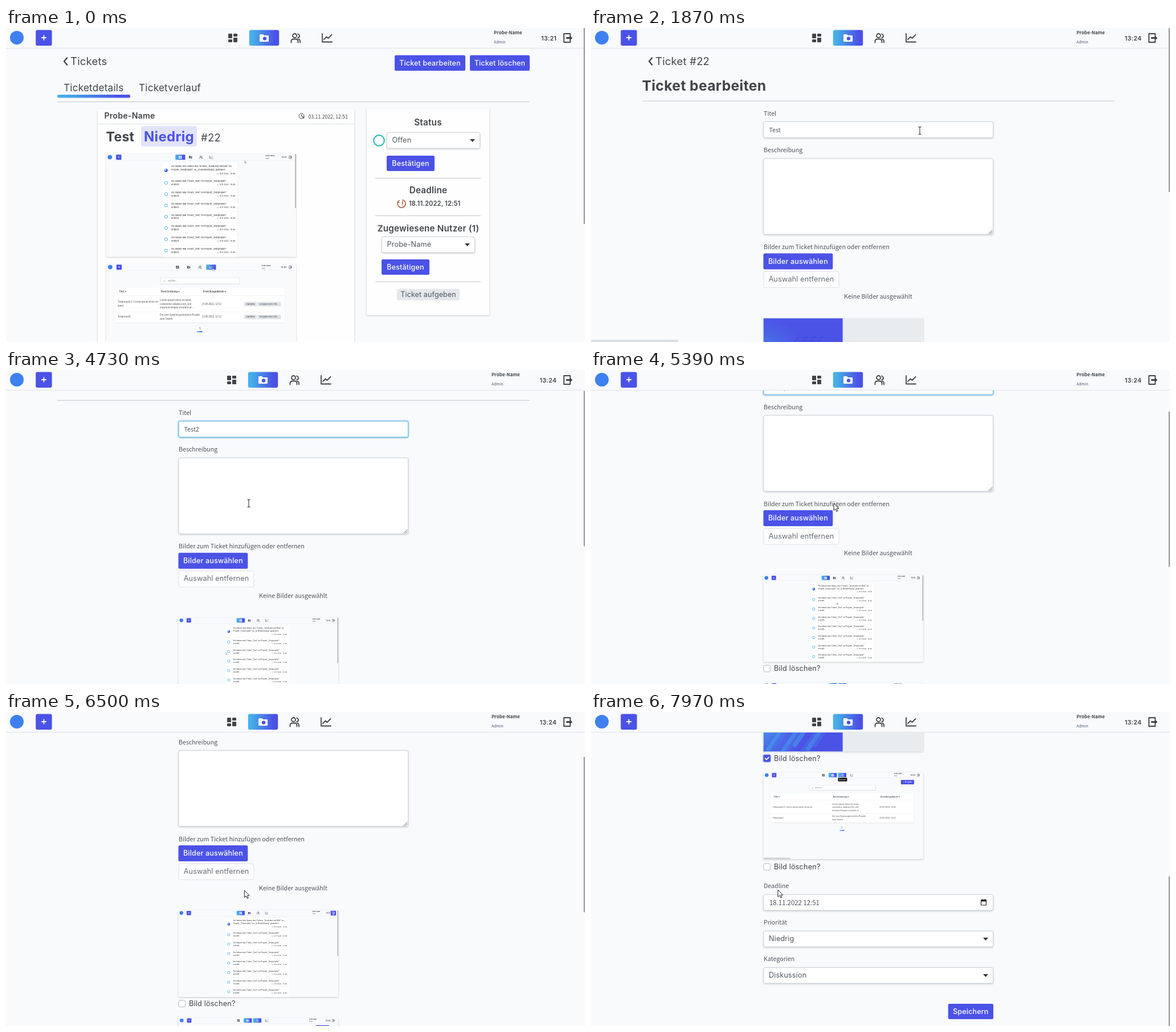
An HTML page that plays this animation: 1016x551 px, repeating every 8000 ms.

```html
<!DOCTYPE html>
<html lang="de">
<head>
<meta charset="utf-8">
<title>Ticket bearbeiten</title>
<style>
html, body { margin: 0; width: 100%; height: 100%; overflow: hidden; background: #f8fafc; }
#stage { display: block; width: 1016px; height: 551px; }
text { font-family: Inter, "Open Sans", sans-serif; letter-spacing: .014em; white-space: pre; }
.body { font-family: "Noto Sans CJK JP", "Noto Sans", sans-serif; letter-spacing: 0; }
.mid { text-anchor: middle; }
.end { text-anchor: end; }
.shadow { filter: drop-shadow(0 1px 1.5px #0003); }
.line { fill: none; stroke-width: 1.8; stroke-linecap: round; stroke-linejoin: round; }
</style>
</head>
<body>
<svg id="stage" viewBox="0 0 1016 551"></svg>
<script>
const INK = '#414449', GREY = '#50555b', BLUE = '#4b52e6', SKY = '#45b0e8', USER = 'Probe-Name';

const rect = (x, y, w, h, fill, r = 0, more = '') =>
  `<rect x="${x}" y="${y}" width="${w}" height="${h}" rx="${r}" fill="${fill}" ${more}/>`;
const text = (x, y, s, size = 12.4, weight = 400, fill = INK, cls = '') =>
  `<text x="${x}" y="${y}" font-size="${size}" font-weight="${weight}" fill="${fill}" class="${cls}">${s}</text>`;
const body = (x, y, s, size = 10.68, fill = GREY, cls = '') => text(x, y, s, size, 400, fill, 'body ' + cls);
const path = (d, color = INK, more = '') => `<path class="line" d="${d}" stroke="${color}" ${more}/>`;
const dot = (x, y, r, fill, more = '') => `<circle cx="${x}" cy="${y}" r="${r}" fill="${fill}" ${more}/>`;
const rule = (x, y, w, color = '#c3c6ca') => rect(x, y, w, 1, color);
const group = (id, s, more = '') => `<g id="${id}" ${more}>${s}</g>`;
const repeat = (n, f) => Array.from({ length: n }, (_, i) => f(i)).join('');

const button = (x, y, w, h, label, id) => rect(x, y, w, h, BLUE, 2.5) +
  (id ? rect(x, y, 0, h, SKY, 2.5, `id="${id}"`) : '') +
  text(x + w / 2, y + h / 2 + 4.2, label, 12.5, 500, '#fff', 'mid');
const field = (x, y, w, h, more = '') =>
  rect(x + .5, y + .5, w - 1, h - 1, '#fff', 2.5, `stroke="#ced4da" class="shadow" ${more}`);
const select = (x, y, w, label) => field(x, y, w, 28.5) + text(x + 9.5, y + 18, label, 12.6, 400, GREY) +
  `<path d="M${x + w - 18} ${y + 12}h9l-4.5 5z" fill="#333"/>`;
const scrollbar = (h, more = '') => rect(1013.5, 0, 2.5, h, '#a0a2a5', 1.2, more);

// Icons are drawn around (0, 18)
const icons = [
  c => rect(-8, 10, 7, 8, c, 1) + rect(1, 10, 7, 5, c, 1) + rect(-8, 20, 7, 5, c, 1) + rect(1, 17, 7, 8, c, 1),
  (c, on) => `<path d="M-8 12q0-1 1-1h5l2 2h7q1 0 1 1v9q0 1-1 1h-14q-1 0-1-1z" fill="${c}"/>` +
    dot(1, 18.5, 3.2, on ? BLUE : '#fff'),
  c => path('M-7.500 25.500v-2q0-4 4-4h4q4 0 4 4v2M5.500 19.500q2.500 1 2.500 4v2M4 10.500q3 1 3 3.500t-3 3.500', c) +
    dot(-1.5, 13.5, 3.5, 'none', `stroke="${c}" stroke-width="1.8"`),
  c => path('M-8 10v14.500h17M-5 20l4.500-4.500 3 2.500 6-6', c)
];
const logout = (x, c = INK) => `<g transform="translate(${x} 0)">` +
  path('M5 13v-3h-11v15h11v-3', c) + `<path d="M-2 16h6v-3.500l5 5-5 5v-3.500h-6z" fill="${c}"/></g>`;

function nav({ active = [1], gap = 55, shift = 0, nameX = 852, time = '13:24', logo = 19 }) {
  const items = icons.map((icon, i) => {
    const on = active.includes(i), x = 561 + shift - (3 - i) * gap;
    return `<g transform="translate(${x} 0)">` + (on ? rect(-26.2, 3.6, 52.4, 27.3, 'url(#fade)', 3) : '') +
      icon(on ? '#fff' : INK, on) + '</g>';
  }).join('');
  return rect(0, 0, 1016, 35, '#f8fafc') + rule(0, 35, 1016, '#dfe2e6') + dot(logo, 17, 12, '#3f80f0') +
    rect(logo + 33.2, 3.6, 28.4, 27.3, BLUE, 3) + path(`M${logo + 43.7} 17h7.500m-3.750-3.750v7.500`, '#fff') + items +
    text(nameX, 10.7, USER, 8, 700, INK, 'body') + body(nameX, 26.8, 'Admin', 6.8, '#4b5b75') +
    text(966, 21.5, time, 10.8, 600, INK, 'end') + logout(985);
}

const thumb = (x, y, w, content) => {
  const box = `x="${x}" y="${y}" width="${w}" height="${w * 551 / 1016}"`;
  return `<rect ${box} fill="#f8fafc" class="shadow"/><svg ${box} viewBox="0 0 1016 551">${content}</svg>`;
};
const pointer = (x, y, id = '') =>
  `<use href="#arrow" ${id && `id="${id}"`} transform="translate(${x} ${y})"/>`;

function dashboard(more) {
  const entry = (y, a, b) => text(348, y, a, 11.7, 500) + text(348, y + 18, b, 11.7, 500);
  const date = y => text(690, y, '◷  10.11.2022 · 10:48', 9.8, 500, INK, 'end');
  const ring = y => dot(320, y, 8, 'none', `stroke="${SKY}" stroke-width="3"`);
  return nav({ active: [0], time: '14:12' }) + rect(299, 46, 405, 510, '#fff', 3, 'class="shadow"') +
    entry(71, 'Sie haben den Status des Tickets „Testticket mit Bild“ im', 'Projekt „Testprojekt“ zu „In Bearbeitung“ geändert.') +
    date(110) + ring(88) + `<path d="M320 80a8 8 0 1 1-8 8h8z" fill="${BLUE}"/>` +
    repeat(7, i => {
      const y = 155 + i * 60.4;
      return rule(299, y - 29, 405, '#e2e5e8') + ring(y) +
        entry(y - 5, 'Sie haben das Ticket „Test“ im Projekt „Testprojekt“', 'erstellt.') + date(y + 13);
    }) + rect(1011, 0, 4, 290, '#999', 2) + more;
}

function projects(stats) {
  const cols = stats ? [67, 293, 518] : [65, 443, 744], heads = ['Titel', 'Beschreibung', 'Erstellungsdatum'];
  const lines = (x, y, list) => list.map((s, i) => body(x, y + i * 20, s, 13, INK)).join('');
  const tag = (x, y, w, s) => rect(x, y, w, 24, '#e1e5e9', 3) + text(x + w / 2, y + 16, s, 12.5, 400, INK, 'mid');
  return nav({ active: stats ? [3] : [1, 2], gap: 60, nameX: 831, time: '14:00', logo: 21 }) +
    `<g transform="translate(0 ${stats ? 0 : 6})">` +
    field(289, 74, 425, 33) + body(329, 95, 'Suchen...', 12, '#777') + path('M310 95l-4 4', '#888') + dot(312, 90, 4, 'none', 'stroke="#888"') +
    rect(49, 128, 908, 186, '#fff', 4, 'class="shadow"') +
    heads.map((s, i) => text(cols[i], 154, s + ' ▾', 13, 600)).join('') + rule(49, 168, 908, '#ddd') + rule(49, 256, 908, '#ddd') +
    lines(cols[0] - 6, stats ? 208 : 219, stats ? ['Testprojekt 2: Lorem ipsum dolor sit', 'amet'] : ['Testprojekt 2: Lorem ipsum dolor sit amet']) +
    lines(cols[0] - 6, 288, ['Testprojekt']) +
    lines(cols[1] - 6, 199, ['Lorem ipsum dolor sit amet,', 'consetetur adipisici elit, sed', 'eiusmod tempor incidunt ut …']) +
    lines(cols[1] - 6, 278, ['Ein vom System generiertes Projekt', 'zum Testen.']) +
    lines(cols[2] - 6, 219, ['23.09.2022, 12:52']) + lines(cols[2] - 6, 288, ['23.09.2022, 12:12']) +
    (stats ? [203, 272].map(y => tag(738, y, 67, 'Statistik') + tag(808, y, 128, 'Vergleichen mit...')).join('')
      : button(874, 42, 84, 28, '+ Projekt')) +
    text(500, 350, '1', 14, 500, INK, 'mid') + rect(485, 360, 30, 5, 'url(#fade)', 2) + '</g>' +
    (stats ? '' : rect(0, 542, 170, 9, '#ccd0d4'));
}

const login = rect(0, 0, 1016, 551, '#e8ecef') + rect(0, 0, 504, 551, 'url(#splash)') +
  repeat(9, i => path(`M${-10 + i * 42} ${560 - i % 3 * 25}l${70 + i % 4 * 25} ${-100 - i % 4 * 36}`,
    i % 2 ? '#46a4ec' : '#4a72ea', 'stroke-opacity=".5" style="stroke-width:26"')) +
  repeat(4, i => path(`M${200 + i * 50} 150l26 -37`, '#444adb', 'stroke-opacity=".5" style="stroke-width:13"'));

const tooltip = (id, x, y, w, s) => group(id, rect(x, y, w, 23, '#111', 3) + text(x + w / 2, y + 15, s, 10, 500, '#fff', 'mid'));

const back = label => path('M107 52.500l-5 6 5 6', INK, 'style="stroke-width:2.4"') + text(113, 64.5, label, 18.4, 400);

const ticketPage = nav({ shift: 2, nameX: 856, time: '13:21' }) + back('Tickets') +
  button(682, 47.7, 124, 27.3, 'Ticket bearbeiten', 'sweepEdit') + button(814, 47.7, 105, 27.3, 'Ticket löschen') +
  text(101, 110.5, 'Ticketdetails', 17.1, 400) + text(233, 110.5, 'Ticketverlauf', 17.1, 400) +
  rect(90, 117, 128, 5.5, 'url(#fade)', 2.5) + rule(90, 129, 829) +
  rect(161, 142, 450, 420, '#fefefe', 2, 'class="shadow"') + text(172.5, 159, USER, 14.2, 600) + rule(161, 168, 450, '#dcdfe3') +
  dot(518.5, 154.5, 4.5, 'none', `stroke="${INK}"`) + path('M518.500 152v3h2', INK, 'style="stroke-width:1"') +
  `<path d="M520 155l4.500 2-2 .7-.8 2z" fill="${INK}"/>` + body(600, 158.5, '03.11.2022, 12:51', 8.7, INK, 'end') +
  text(175.5, 198.5, 'Test', 23, 700) + rect(237, 172, 98, 36, '#e2e3fa', 4) + text(286, 198.5, 'Niedrig', 24, 700, BLUE, 'mid') +
  text(342, 198.5, '#22', 18.5) +
  thumb(176, 221, 333, dashboard(pointer(741, 36))) +
  thumb(176, 414, 333, projects(true) + '<use href="#hand" transform="translate(570 20)"/>') +
  rect(633, 142, 215, 362, '#fefefe', 2, 'class="shadow"') +
  text(740.5, 171, 'Status', 15.3, 600, INK, 'mid') + dot(654.5, 197.5, 9.3, '#fff', 'stroke="#2fbdb6" stroke-width="2.2"') +
  select(668, 183, 164, 'Offen') + button(668, 224, 84, 27, 'Bestätigen') + rule(648, 263, 185) +
  text(741, 290, 'Deadline', 15.3, 600, INK, 'mid') +
  path('M690 302.500a7 7 0 1 0 6 -1M696 304v5m0 3v.1M690 306h-1.500', '#a85a32', 'style="stroke-width:1.5"') +
  text(707, 312, '18.11.2022, 12:51', 11.1, 600) + rule(648, 329, 185) +
  text(741, 356.5, 'Zugewiesene Nutzer (1)', 15.2, 600, INK, 'mid') + select(659, 366, 164, USER) +
  button(659, 406, 84, 27, 'Bestätigen') + rule(648, 445, 185) +
  rect(686, 458, 110, 20, '#e3e8ec', 3) + text(741, 472.3, 'Ticket aufgeben', 12.4, 400, GREY, 'mid') +
  scrollbar(344);

const check = y => rect(303, y - 5.5, 11.5, 11.5, '#fff', 2.5, 'stroke="#b5b9be"') + text(321, y + 4.5, 'Bild löschen?', 12.7, 400);

const editPage = group('scroller', back('Ticket #22') + text(89.5, 109.8, 'Ticket bearbeiten', 24.7, 700) + rule(90, 127.5, 829) +
  body(303, 153.6, 'Titel') + field(302.5, 164, 403.5, 29) +
  group('focus', rect(302, 163.5, 404.5, 30, 'none', 3.5, `stroke="${SKY}" stroke-width="2.4" stroke-opacity=".25"`) +
    rect(303, 164.5, 402.5, 28, 'none', 2.5, 'stroke="#62bdec"')) +
  body(312.5, 183, '<tspan id="typed">Test</tspan>') + rect(332, 171, 1, 15, '#222', 0, 'id="caret"') +
  body(303, 218, 'Beschreibung') + field(302.5, 228.5, 403.5, 134) + path('M698 361l6-6m-3 6l3-3', '#666', 'style="stroke-width:1"') +
  body(303, 388, 'Bilder zum Ticket hinzufügen oder entfernen') +
  button(302.5, 395.4, 121.8, 28, 'Bilder auswählen', 'sweepPick') +
  rect(303, 427.5, 132, 28, '#fefefe', 2.5, 'stroke="#dfe2e6" id="clear"') + text(369, 445, 'Auswahl entfernen', 12.6, 400, '#666b71', 'mid') +
  body(504, 474.7, 'Keine Bilder ausgewählt', 10.68, GREY, 'mid') +
  group('pictures', thumb(302.5, 509.3, 280.5, group('login', login) + group('dash', dashboard(
    group('exit', rect(968, 3, 34, 30, BLUE, 3, 'id="exitBg"') + logout(985, '#fff')) +
    tooltip('exitTip', 900, 8, 64, 'Ausloggen') + pointer(302, 222, 'dashPointer')))) +
    check(673) + group('checked', rect(301, 665.5, 15.5, 15.5, '#9db4f6', 4, 'opacity=".55"') + rect(302.5, 667, 12.5, 12.5, BLUE, 2.5) +
      path('M305.700 673.300l2.200 2.200 4-4', '#fff')) +
    thumb(302.5, 698, 280.5, projects(false) + tooltip('userTip', 474, 34, 58, 'Benutzer') + pointer(502, 16))) +
  check(863.5) + body(303, 901, 'Deadline') + field(302.5, 912, 403.5, 28.5) + body(313, 930.5, '18.11.2022 12:51', 11.4) +
  rect(684.5, 922, 9, 9, 'none', 1, 'stroke="#222" stroke-width="1.2"') + rect(684, 921.5, 10, 3, '#222') + rect(686, 920, 1.2, 2, '#222') + rect(691, 920, 1.2, 2, '#222') +
  body(303, 965, 'Priorität') + select(302.5, 976, 403.5, 'Niedrig') +
  body(303, 1029, 'Kategorien') + select(302.5, 1040, 403.5, 'Diskussion') +
  button(626.7, 1104, 79.3, 27, 'Speichern')) +
  nav({}) + scrollbar(273, 'id="bar"');

const stage = document.getElementById('stage');
stage.innerHTML = `<defs>
  <linearGradient id="fade"><stop offset=".1" stop-color="${SKY}"/><stop offset=".85" stop-color="${BLUE}"/></linearGradient>
  <radialGradient id="splash" cx="-.05" cy=".6" r=".75"><stop stop-color="#45a8ea"/><stop offset=".55" stop-color="#4a66e7"/><stop offset=".85" stop-color="${BLUE}"/></radialGradient>
  <path id="arrow" d="M0 0v12.500l2.900-2.600 2 4.400 2-.9-2-4.300h3.900z" fill="#fff" stroke="#222"/>
  <path id="hand" d="M-1 1q1-2 2 0v6l5 1q2 .6 2 3l-1 6h-7l-4-6q0-2 3-.5z" fill="#fff" stroke="#222"/>
  <path id="beam" d="M-2.500 -6.500h2q.5 0 .5 1 0-1 .5-1h2M0 -6v12M-2.500 6.500h2q.5 0 .5-1 0 1 .5 1h2" fill="none" stroke="#222"/>
  </defs>` + rect(0, 0, 1016, 551, '#f8fafc') + group('ticket', ticketPage) + group('edit', editPage) +
  rect(0, 547, 153, 4, '#dcdfe3', 1, 'id="status"') + '<use id="cursor"/>';

const $ = id => document.getElementById(id);
const set = (id, name, value) => $(id).setAttribute(name, value);
const show = (id, on) => { $(id).style.display = on ? '' : 'none'; };
const clamp = v => Math.min(1, Math.max(0, v));

// Eased value list between keys of the form [time, ...values]
function at(keys, t) {
  const n = keys.findIndex(k => k[0] > t);
  if (n <= 0) return (n ? keys[keys.length - 1] : keys[0]).slice(1);
  const a = keys[n - 1], b = keys[n], p = (t - a[0]) / (b[0] - a[0]), e = p * p * (3 - 2 * p);
  return a.slice(1).map((v, i) => v + (b[i + 1] - v) * e);
}

const mouse = [[70, 980, 190], [400, 850, 105], [720, 752, 63], [1650, 752, 63], [1870, 577, 180], [2350, 497, 180],
  [2930, 497, 180], [3090, 504, 198], [3930, 504, 198], [4350, 426, 234], [5560, 426, 234], [5800, 403, 262],
  [6220, 422, 310], [6450, 420, 312], [7150, 310, 374], [7420, 310, 374], [7880, 328, 312]];
const scroll = [[4400, 0], [4620, 74.7], [4900, 74.7], [5120, 149.3], [6450, 149.3], [6650, 224], [6750, 224], [6950, 298.6],
  [7430, 298.6], [7900, 592]];
const dashMouse = [[4730, 302, 222], [5000, 302, 222], [6220, 983, 24], [7370, 983, 15]];
const zones = [['beam', 706, 164, 193], ['beam', 706, 228, 362], ['hand', 424, 395, 423], ['hand', 435, 427, 455], ['hand', 401, 666, 681]];

const hover = (t, from, to, time) => clamp((t - from) / time) - clamp((t - to) / time);

function cursorKind(t, x, y) {
  if (t < 1050) return x > 682 && x < 919 && y > 48 && y < 75 ? 'hand' : 'arrow';
  const zone = zones.find(([, right, top, bottom]) => x > 303 && x < right && y > top && y < bottom);
  return zone ? zone[0] : 'arrow';
}

function draw() {
  const t = performance.now() % 8000, [x, y] = at(mouse, t), [top] = at(scroll, t), typed = t >= 3930;
  show('ticket', t < 1050);
  show('edit', t >= 1050);
  show('status', t > 800 && t < 2400);
  show('pictures', t > 1600);
  set('sweepEdit', 'width', 124 * hover(t, 620, 9000, 300));
  set('sweepPick', 'width', 121.8 * hover(t, 5690, 6028, 300));
  set('clear', 'fill', t > 6040 && t < 6260 ? '#f2f4f6' : '#fefefe');
  set('scroller', 'transform', `translate(0 ${-top})`);
  set('bar', 'y', top * .487);
  set('bar', 'height', Math.min(t < 2100 ? 288 : 273, 551 - top * .487));

  set('focus', 'opacity', clamp((t - 2520) / 180));
  $('typed').textContent = typed ? 'Test2' : 'Test';
  const blink = t - (typed ? 3930 : 2540);
  show('caret', blink >= 0 && Math.floor(blink / 530) % 2 === 0);
  if (t >= 1050) set('caret', 'x', 312.5 + $('typed').getComputedTextLength());

  const signedOut = t < 4200 || t > 7700;
  show('login', signedOut);
  show('dash', !signedOut);
  show('exit', t > 6150);
  set('exitBg', 'fill', t > 6900 ? SKY : BLUE);
  show('exitTip', t > 6900);
  show('userTip', t > 7600);
  set('dashPointer', 'transform', `translate(${at(dashMouse, t)})`);
  show('checked', t >= 7300);

  show('cursor', t >= 70);
  set('cursor', 'href', '#' + cursorKind(t, x, y + top));
  set('cursor', 'transform', `translate(${x} ${y})`);
  requestAnimationFrame(draw);
}
draw();
</script>
</body>
</html>
```
